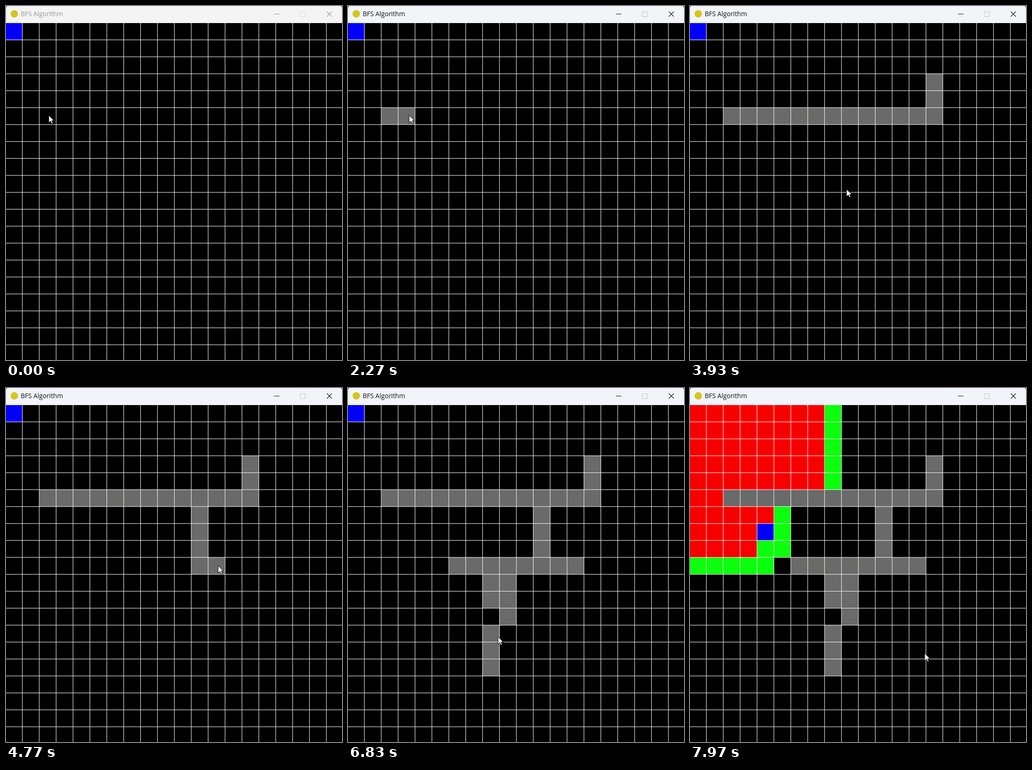
Recreate the animation shown at these times as an HTML page with a canvas. Size 730 px wide and 767 px high, loop 8 s.

```html
<!DOCTYPE html>
<html lang="en">
<head>
<meta charset="utf-8">
<title>BFS Algorithm</title>
<style>
html, body { margin: 0; width: 100%; height: 100%; overflow: hidden; background: #000; }
canvas { display: block; }
</style>
</head>
<body>
<canvas id="stage" width="730" height="767"></canvas>
<script>
const ctx = document.getElementById('stage').getContext('2d');
const LOOP = 8000, FRAME = 1000 / 30;
const CELL = 36.7, LEFT = -1.2, TOP = 36.7, SIZE = 20;
const FOCUS_AT = 1300, SEARCH_AT = 7012, STEP = 17.2;

// time, x, y, button held until the next entry
const path = [
  [0, 93, 237, 0], [FOCUS_AT, 93, 237, 1], [2000, 100, 237, 1], [2267, 133, 237, 1],
  [2900, 520, 239, 1], [2950, 530, 235, 1], [3150, 532, 165, 0], [3300, 525, 175, 0],
  [3933, 340, 397, 0], [4250, 418, 275, 1], [4650, 420, 385, 1], [4850, 490, 385, 1],
  [5300, 236, 388, 0], [5733, 345, 412, 0], [5850, 310, 415, 1], [5980, 312, 465, 1],
  [6050, 345, 465, 1], [6130, 346, 415, 1], [6300, 345, 505, 0], [6380, 315, 530, 1],
  [6600, 312, 605, 1], [6833, 326, 539, 0], [7000, 330, 538, 0], [7500, 362, 564, 0],
  [7967, 510, 575, 0], [LOOP, 520, 575, 0]
];

function mouseAt(t) {
  const i = Math.max(1, path.findIndex(p => p[0] > t));
  const [t0, x0, y0, down] = path[i - 1], [t1, x1, y1] = path[i];
  const k = (t - t0) / (t1 - t0);
  return { x: x0 + (x1 - x0) * k, y: y0 + (y1 - y0) * k, down };
}

const key = (col, row) => row * SIZE + col;

// Each wall cell is painted when the held mouse first reaches it.
const walls = new Map();
for (let t = 0; t < SEARCH_AT; t += 4) {
  const { x, y, down } = mouseAt(t);
  const id = key(Math.floor((x - LEFT) / CELL), Math.floor((y - TOP) / CELL));
  if (down && !walls.has(id)) walls.set(id, t);
}

// Breadth-first search with eight neighbours; found holds the discovery step.
const queue = [0], found = new Map([[0, -1]]);
for (let n = 0; n < queue.length; n++) {
  const col = queue[n] % SIZE, row = Math.floor(queue[n] / SIZE);
  for (let dx = -1; dx <= 1; dx++) {
    for (let dy = -1; dy <= 1; dy++) {
      const c = col + dx, r = row + dy, id = key(c, r);
      if (c < 0 || r < 0 || c >= SIZE || r >= SIZE) continue;
      if (walls.has(id) || found.has(id)) continue;
      found.set(id, n);
      queue.push(id);
    }
  }
}

function fillCell(id, color) {
  ctx.fillStyle = color;
  ctx.fillRect(LEFT + id % SIZE * CELL, TOP + Math.floor(id / SIZE) * CELL, CELL, CELL);
}

function drawGrid() {
  ctx.fillStyle = 'rgba(255,255,250,.88)';
  for (let i = 1; i < SIZE; i++) {
    ctx.fillRect(LEFT + i * CELL - .6, 37, 1.2, 730);
    ctx.fillRect(0, TOP + i * CELL - .6, 730, 1.2);
  }
}

function drawTitleBar(active) {
  const ink = active ? '#111' : '#999';
  ctx.fillStyle = active ? '#f1f4f9' : '#f4f4f5';
  ctx.beginPath();
  ctx.roundRect(0, 0, 730, 37, [4, 4, 0, 0]);
  ctx.fill();
  ctx.fillStyle = '#d6c520';
  ctx.beginPath();
  ctx.arc(18, 17, 8, 0, Math.PI * 2);
  ctx.fill();
  ctx.fillStyle = ink;
  ctx.font = '14px "Open Sans", "Noto Sans", sans-serif';
  ctx.fillText('BFS Algorithm', 32, 22);
  ctx.lineWidth = 1.1;
  ctx.strokeStyle = ink;
  ctx.stroke(new Path2D('M582 17.5H594M697 12L708 23M708 12L697 23'));
  ctx.strokeStyle = active ? '#c5cbbd' : '#dfe1dc';
  ctx.strokeRect(639.5, 12.5, 10.5, 10.5);
}

const arrow = new Path2D('M0 0V16L3.8 12.5L6.4 18L9 16.8L6.4 11.6H11.3Z');
function drawMouse({ x, y }) {
  ctx.save();
  ctx.translate(x, y);
  ctx.fillStyle = '#fff';
  ctx.strokeStyle = '#000';
  ctx.lineWidth = 1;
  ctx.fill(arrow);
  ctx.stroke(arrow);
  ctx.restore();
}

function draw(time) {
  const t = Math.floor((time % LOOP + 5) / FRAME) % 240 * FRAME;
  const step = Math.max(0, Math.floor((t - SEARCH_AT) / STEP));
  ctx.fillStyle = '#000';
  ctx.fillRect(0, 0, 730, 767);
  walls.forEach((at, id) => { if (at <= t) fillCell(id, '#6a6a6a'); });
  queue.forEach((id, n) => {
    if (n < step) fillCell(id, '#f60000');
    else if (n === step) fillCell(id, '#0000fa');
    else if (t >= SEARCH_AT && found.get(id) <= step) fillCell(id, '#0cff0c');
  });
  drawGrid();
  drawTitleBar(t >= FOCUS_AT);
  drawMouse(mouseAt(t));
}

const start = performance.now();
function tick() {
  draw(performance.now() - start);
  requestAnimationFrame(tick);
}
tick();
</script>
</body>
</html>
```
